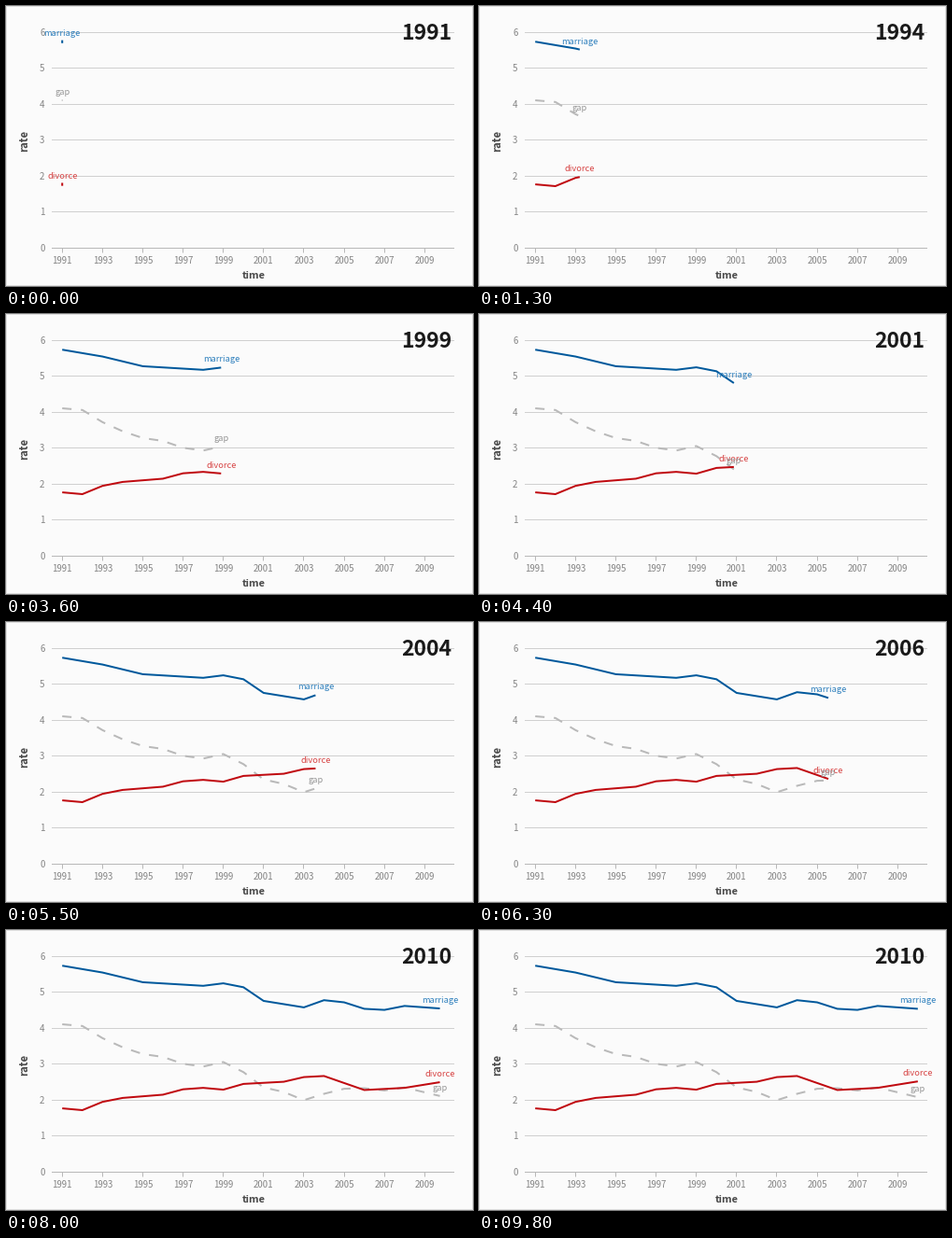
These frames come from a looping animation (500x300 px, 10 s). A matplotlib script:

```python
import numpy as np
import matplotlib.pyplot as plt
from matplotlib.animation import FuncAnimation

W, H, DPI = 500, 300, 100
PT = 72 / DPI
FRAMES, INTERVAL = 100, 100
STEP = 405  # ms spent on each year
FIRST, LAST = 1991, 2010
FONT = "Noto Sans CJK JP"
GRAY, AXIS, GRID = "#848484", "#b8b8b8", "#d0d0d0"

years = np.arange(LAST - FIRST + 1)


def trend(**turns):
    """Yearly rates, straight between the turning points."""
    return np.interp(years, [int(k[1:]) - FIRST for k in turns],
                     list(turns.values()))


marriage = trend(y1991=5.76, y1993=5.57, y1995=5.30, y1998=5.20, y1999=5.27,
                 y2000=5.16, y2001=4.78, y2003=4.60, y2004=4.80, y2005=4.74,
                 y2006=4.56, y2007=4.53, y2008=4.64, y2010=4.56)
divorce = trend(y1991=1.79, y1992=1.74, y1993=1.97, y1994=2.08, y1996=2.17,
                y1997=2.32, y1998=2.36, y1999=2.31, y2000=2.47, y2002=2.53,
                y2003=2.66, y2004=2.69, y2006=2.30, y2008=2.36, y2010=2.54)
gap = 1.04 * (marriage - divorce)


def px(year):
    return 60.2 + 21.56 * year


def py(rate):
    return 260 - 38.5 * rate


fig = plt.figure(figsize=(W / DPI, H / DPI), dpi=DPI, facecolor="#fbfbfb")
ax = fig.add_axes([0, 0, 1, 1])
ax.set_xlim(0, W)
ax.set_ylim(H, 0)
ax.axis("off")


def rule(x, y, color, width=1, **kw):
    return ax.plot(x, y, color=color, lw=width * PT, snap=False,
                   solid_capstyle="butt", dash_capstyle="butt", **kw)[0]


def label(x, y, s, size, color, ha="center", va="baseline", **kw):
    return ax.text(x, y, s, fontsize=size * PT, color=color, family=FONT,
                   ha=ha, va=va, **kw)


# frame, grid and axes
rule([0.5, 499.5, 499.5, 0.5, 0.5], [0.5, 0.5, 299.5, 299.5, 0.5], "#dedede")
for v in range(7):
    y = np.floor(py(v) - 1) + 0.5
    rule([49, 480], [y, y], GRID if v else AXIS, zorder=1)
    label(41.5, y + 3.6, str(v), 9.7, GRAY, ha="right")
for k in range(0, len(years), 2):
    x = np.floor(px(k)) + 0.5
    rule([x, x], [260, 264.5], AXIS)
    label(px(k), 276, str(FIRST + k), 9.7, GRAY)
label(264.8, 292.5, "time", 11, "#484848", weight="bold")
label(20, 144.5, "rate", 11.4, "#484848", va="center", rotation=90,
      weight="bold")
clock = label(477.5, 35.5, "", 23, "#1a1a1a", ha="right", weight="bold")


class Series:
    def __init__(self, name, data, color, text_color, z, width=2, style="-"):
        self.data = data
        self.line = rule([], [], color, 2, zorder=z, linestyle=style)
        self.stub = rule([], [], color, width, zorder=z)
        self.reach = 0.8 * width
        self.text = label(0, 0, name, 9.3, text_color, zorder=5)

    def draw(self, p):
        done = years[years < p]
        x, y = px(p), py(np.interp(p, years, self.data))
        self.line.set_data(np.append(px(done), x),
                           np.append(py(self.data[:len(done)]), y))
        reach = self.reach if p == 0 else 0
        self.stub.set_data([x, x], [y - reach, y + reach])
        self.text.set_position((x, y - 6))


series = [
    Series("marriage", marriage, "#00599c", "#2f80bd", 3),
    Series("divorce", divorce, "#c00a10", "#d84848", 3),
    Series("gap", gap, "#b9b9b9", "#979797", 2, width=1, style=(0, (5, 5))),
]


def update(i):
    p = min(max((i * INTERVAL - STEP) / STEP, 0), LAST - FIRST)
    for s in series:
        s.draw(p)
    clock.set_text(str(FIRST + int(np.ceil(p))))
    return []


anim = FuncAnimation(fig, update, frames=FRAMES, interval=INTERVAL,
                     repeat=True, repeat_delay=0)
plt.show()
```
